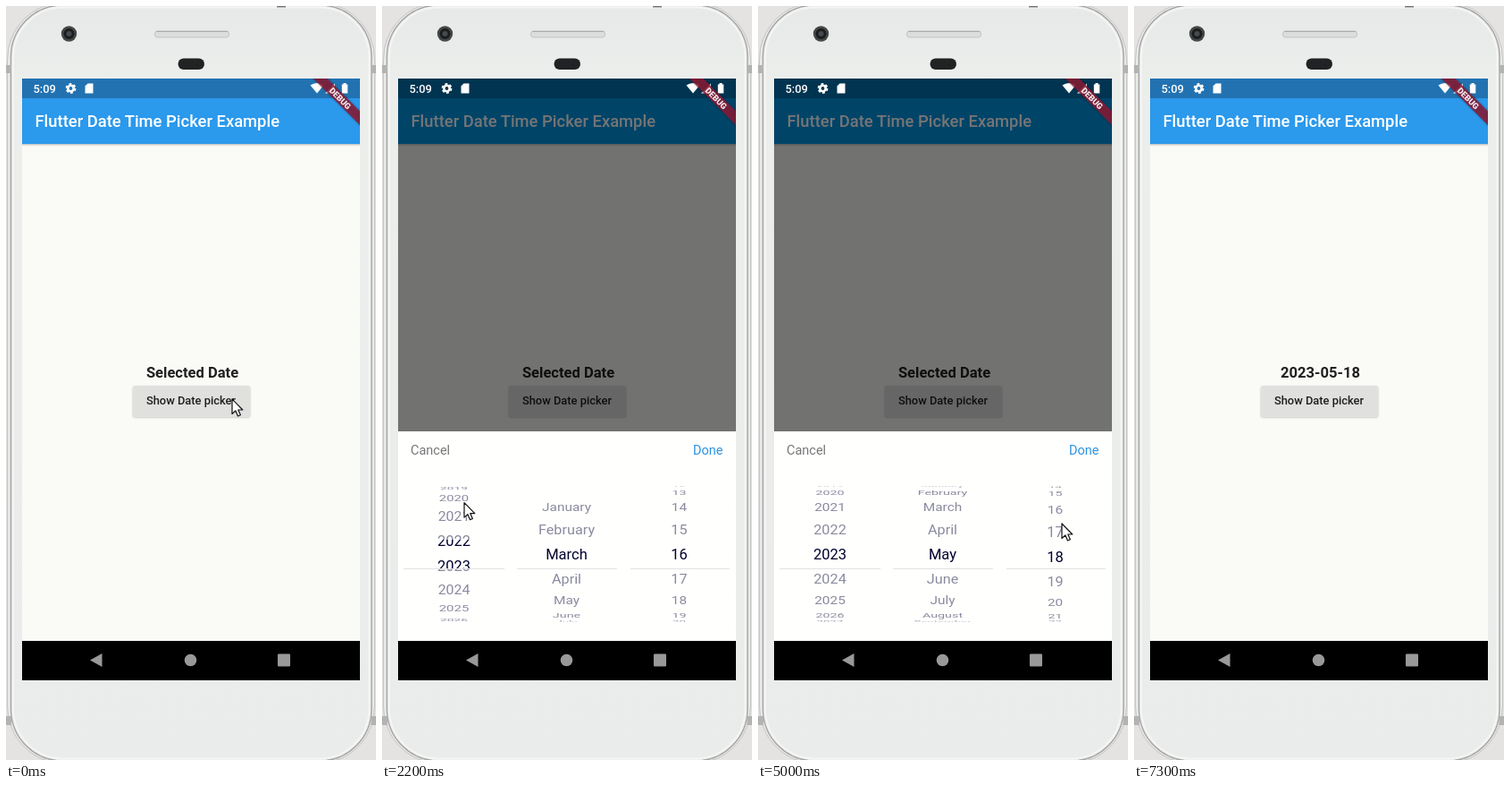
Animation, 414 px wide and 842 px high, one loop 8100 ms. Source, as an HTML page:

```html
<!DOCTYPE html>
<html lang="en">
<head>
<meta charset="utf-8">
<title>Date picker demo</title>
<style>
html, body { margin: 0; width: 100%; height: 100%; overflow: hidden; background: #e4e3e1; }
svg { display: block; width: 414px; height: 842px; font-family: Roboto, sans-serif; }
.mid { text-anchor: middle; }
.medium { font-weight: 500; }
</style>
</head>
<body>
<svg viewBox="0 0 414 842">
  <defs>
    <linearGradient id="shell" x2="0" y2="1">
      <stop offset="0" stop-color="#e7e9e9"/>
      <stop offset=".1" stop-color="#eceeec"/>
      <stop offset="1" stop-color="#eaeceb"/>
    </linearGradient>
    <filter id="soft" x="-10%" y="-40%" width="120%" height="200%"><feGaussianBlur stdDeviation="1.3"/></filter>
    <clipPath id="screen"><rect x="18" y="81" width="378" height="628"/></clipPath>
    <clipPath id="drum"><rect x="18" y="536.5" width="378" height="151"/></clipPath>
  </defs>

  <!-- phone -->
  <rect width="414" height="842" fill="#e4e3e1"/>
  <rect x="1.5" y="-4" width="411" height="850" rx="64" fill="#e9e9e7" stroke="#c4c4c2"/>
  <rect x="5.5" y="-1" width="403.500" height="844" rx="58" fill="url(#shell)" stroke="#a5a5a3" stroke-width="1.400"/>
  <rect x="8" y="1.500" width="398.500" height="839" rx="56" fill="none" stroke="#f4f5f4" stroke-width="2"/>
  <g fill="#b3b3b1">
    <rect y="66" width="6" height="9"/><rect x="408.500" y="66" width="6" height="9"/>
    <rect y="793" width="6" height="10"/><rect x="408.500" y="793" width="6" height="10"/>
  </g>
  <rect x="303" width="10" height="1.500" fill="#777"/>
  <circle cx="70.500" cy="31" r="8.700" fill="#464848"/>
  <circle cx="70.500" cy="31" r="6" fill="#1b1d1e"/>
  <circle cx="70.500" cy="31" r="3" fill="#454b50"/>
  <rect x="166.500" y="28" width="83" height="7" rx="3" fill="#dcdddd" stroke="#c2c3c3"/>
  <path d="M168 28.500H248" stroke="#a9aaab"/>
  <rect x="192.500" y="58.500" width="29.500" height="12.500" rx="6.200" fill="#202223"/>

  <!-- app -->
  <g clip-path="url(#screen)">
    <rect x="18" y="81" width="378" height="628" fill="#fafaf7"/>
    <rect x="14" y="150" width="386" height="5" opacity=".28" filter="url(#soft)"/>
    <rect x="18" y="103" width="378" height="51" fill="#2b99ec"/>
    <rect x="18" y="81" width="378" height="22" fill="#2272b1"/>
    <g id="tint">
      <rect x="18" y="103" width="378" height="51" fill="#0094e4"/>
      <rect x="18" y="81" width="378" height="22" fill="#0071ae"/>
    </g>
    <text x="32.500" y="135.300" font-size="18.400" class="medium" fill="#fff">Flutter Date Time Picker Example</text>
    <text id="label" x="208.500" y="415" font-size="16.560" font-weight="700" class="mid" fill="#202020"></text>
    <rect x="142" y="425" width="131" height="34.500" rx="2" opacity=".25" filter="url(#soft)"/>
    <rect x="142" y="424" width="131" height="35" rx="2" fill="#e0e0df"/>
    <text x="207" y="445.300" font-size="12.880" class="mid medium" fill="#1f1f1f">Show Date picker</text>
    <rect id="dim" x="18" y="81" width="378" height="628"/>
    <g id="sheet">
      <rect x="18" y="475" width="378" height="236" fill="#fffffe"/>
      <text x="32" y="500.700" font-size="14.500" fill="#777">Cancel</text>
      <text x="381.500" y="500.700" font-size="14.500" fill="#2b93e0" text-anchor="end">Done</text>
      <g id="wheels" clip-path="url(#drum)" font-size="16.560" fill="#00002e" class="mid"></g>
      <path d="M18 530H396V596H18ZM18 628.500H396V692H18Z" fill="#fff" opacity=".54"/>
      <path d="M24 628.500H137M151 628.500H263M278 628.500H389" stroke="#e2e2e2"/>
    </g>

    <!-- status bar -->
    <g fill="#fff">
      <text x="30.500" y="97" font-size="12.900" class="medium">5:09</text>
      <circle cx="72.500" cy="92" r="3.200" fill="none" stroke="#fff" stroke-width="2.600"/>
      <circle cx="72.500" cy="92" r="5" fill="none" stroke="#fff" stroke-width="1.800" stroke-dasharray="2.800 2.436"/>
      <path d="M91.500 86.500H97.500V97.500H88.500V89.500Z"/>
      <path d="M340.500 88.500Q348 83.500 355.500 88.500L348 97.500Z"/>
      <path d="M368 86.500V97.500H357Z"/>
      <path d="M375.800 87.500H377.500V86H380.500V87.500H382.300V97.500H375.800Z"/>
    </g>
    <g transform="translate(396 81) rotate(45)">
      <rect x="-60" y="25.800" width="120" height="11" opacity=".4" filter="url(#soft)"/>
      <rect x="-60" y="25.800" width="120" height="11" fill="#8f1c38" opacity=".82"/>
      <text y="34.700" font-size="9.400" font-weight="900" class="mid" fill="#f4eaec">DEBUG</text>
    </g>
  </g>

  <!-- navigation bar -->
  <rect x="18" y="709" width="378" height="44"/>
  <g fill="#999">
    <path d="M94 730.500L107.500 723V738Z"/>
    <circle cx="206.500" cy="730.500" r="6.800"/>
    <rect x="304" y="723.500" width="14" height="14" rx="1"/>
  </g>

  <path id="cursor" d="M0 0V16.500L3.900 13L6.500 19L9.400 17.800L6.800 12H11.800Z" fill="#fff" stroke="#111" stroke-width="1.200" stroke-linejoin="round"/>
</svg>

<script>
const LOOP = 8100, STEP = 100;
const CENTER = 612, RADIUS = 76, ANGLE = 0.377, SLOTS = 11;
const MAX_DIM = 0.54;
const MONTHS = ['January', 'February', 'March', 'April', 'May', 'June', 'July',
  'August', 'September', 'October', 'November', 'December'];

// Rows are [time, value, ...]
const pointer = [
  [0, 253, 439], [800, 253, 439], [1300, 131, 597], [1500, 92, 634],
  [1600, 92, 634], [2300, 92, 550], [2400, 92, 550], [2900, 211, 590],
  [3000, 211, 590], [3200, 209, 636], [3700, 209, 580], [3800, 209, 580],
  [4200, 341, 615], [4400, 340, 634], [5000, 340, 578], [5100, 340, 578],
  [5700, 363, 502], [6600, 363, 502], [7200, 416, 640]
];
const sheetTrack = [[200, 0], [300, .3], [400, .76], [500, .95], [600, 1],
  [6200, 1], [6300, .76], [6400, .316], [6500, 0]];
const dimTrack = [[200, 0], [300, .14], [400, .35], [500, .5], [600, MAX_DIM],
  [6200, MAX_DIM], [6300, .46], [6400, .3], [6500, 0]];
const columns = [
  { x: 80.5, track: [[1600, 2020], [2400, 2023]], name: n => n },
  { x: 206.5, track: [[3200, 2], [3800, 4]], name: n => MONTHS[n] || '' },
  { x: 332.5, track: [[4400, 16], [5100, 18]], name: n => n > 0 && n < 32 ? n : '' }
];

const $ = id => document.getElementById(id);
const [label, dim, tint, sheet, wheels, cursor] =
  ['label', 'dim', 'tint', 'sheet', 'wheels', 'cursor'].map($);
const linear = p => p;
const smooth = p => p * p * (3 - 2 * p);

function sample(track, t, ease) {
  const next = track.findIndex(row => row[0] > t);
  if (next === 0) return track[0].slice(1);
  if (next < 0) return track[track.length - 1].slice(1);
  const a = track[next - 1], b = track[next];
  const p = ease((t - a[0]) / (b[0] - a[0]));
  return a.slice(1).map((v, i) => v + (b[i + 1] - v) * p);
}

for (const col of columns) {
  col.items = Array.from({ length: SLOTS }, () => {
    const el = document.createElementNS('http://www.w3.org/2000/svg', 'text');
    el.setAttribute('y', 5.9);
    return wheels.appendChild(el);
  });
}

function turn(col, t) {
  const [pos] = sample(col.track, t, smooth);
  col.items.forEach((el, i) => {
    const n = Math.round(pos) + i - (SLOTS >> 1);
    const angle = (n - pos) * ANGLE;
    const visible = Math.abs(angle) < Math.PI / 2;
    el.textContent = visible ? col.name(n) : '';
    if (!visible) return;
    const depth = Math.cos(angle);
    const sx = 1 / (1 + .27 * (1 - depth));
    const y = CENTER + RADIUS * Math.sin(angle);
    el.setAttribute('transform', `translate(${col.x} ${y}) scale(${sx} ${Math.max(depth, .2)})`);
  });
}

function draw(t) {
  const [open] = sample(sheetTrack, t, linear);
  const [shade] = sample(dimTrack, t, linear);
  const [x, y] = sample(pointer, t, smooth);
  sheet.setAttribute('transform', `translate(0 ${234 * (1 - open)})`);
  dim.setAttribute('opacity', shade);
  tint.setAttribute('opacity', shade / MAX_DIM);
  label.textContent = t < 6300 ? 'Selected Date' : '2023-05-18';
  cursor.setAttribute('transform', `translate(${x} ${y})`);
  columns.forEach(col => turn(col, t));
}

const start = performance.now();
function tick() {
  const t = (performance.now() - start) % LOOP;
  draw(Math.floor(t / STEP) * STEP);
  requestAnimationFrame(tick);
}
tick();
</script>
</body>
</html>
```
